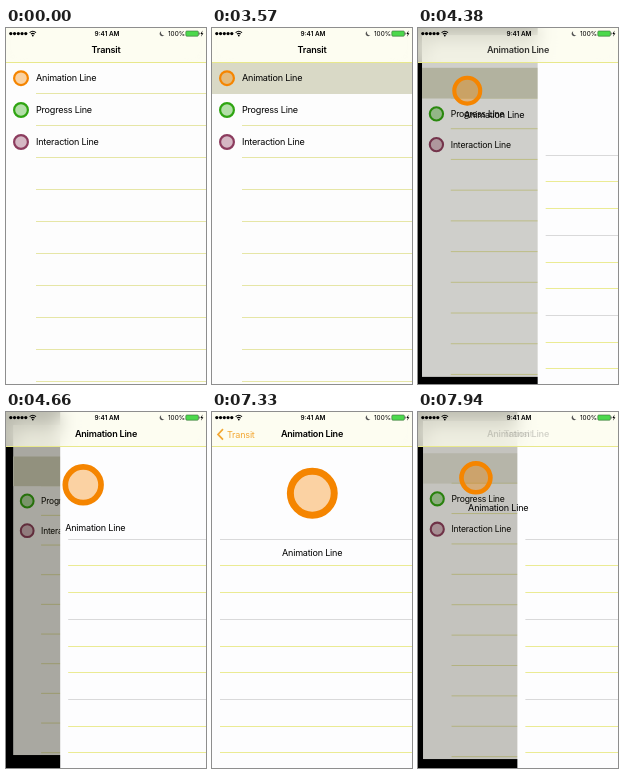
Animation of 200 by 356 pixels, one loop 8000 ms. Source, as an HTML page:

```html
<!DOCTYPE html>
<html lang="en">
<head>
<meta charset="utf-8">
<title>Line list transition</title>
<style>
  html, body { margin: 0; width: 100%; height: 100%; overflow: hidden; background: #000; }
  svg { display: block; position: absolute; left: 0; top: 0; }
  text { font: 9.07px Inter, "Open Sans", sans-serif; letter-spacing: -.024em; fill: #000; }
  .title { font-weight: 600; text-anchor: middle; }
  .status { font-size: 6.4px; font-weight: 600; letter-spacing: 0; }
  #bar {
    position: absolute; left: 0; top: 0; width: 200px; height: 34px;
    background: rgba(252, 252, 236, .74);
    -webkit-backdrop-filter: blur(9px); backdrop-filter: blur(9px);
  }
</style>
</head>
<body>
<svg id="scene" width="200" height="356">
  <g id="list">
    <rect width="200" height="356" fill="#fdfdfd"/>
    <g id="listLines"></g>
    <rect id="highlight" y="34" width="200" height="32" fill="#d9d9c6"/>
    <g id="rows"></g>
    <rect id="shade" width="200" height="356" fill="#181400"/>
  </g>
  <g id="panel">
    <rect width="200" height="356" fill="#fdfdfe"/>
    <g id="panelLines"></g>
  </g>
  <g id="disc"></g>
  <text id="label">Animation Line</text>
</svg>
<div id="bar">
  <svg width="200" height="35">
    <path d="M0 34.5H200" stroke="#e8e88c"/>
    <g id="signal"></g>
    <path d="M23.6 4.7Q26.8 1.9 30 4.7M24.9 6.2Q26.8 4.6 28.7 6.2" fill="none" stroke="#000" stroke-width="1.1"/>
    <circle cx="26.8" cy="7.6" r=".9"/>
    <text class="status" x="101" y="7.9" text-anchor="middle">9:41 AM</text>
    <path d="M155.2 3.2A2.6 2.6 0 1 0 158.4 7A2.7 2.7 0 0 1 155.2 3.2" fill="#555"/>
    <text class="status" x="162" y="7.9" style="font-weight:400">100%</text>
    <rect x="179.8" y="3" width="12.6" height="5.2" rx="1" fill="#4cd94c" stroke="#3a6a3a" stroke-width=".6"/>
    <path d="M193.2 4.6v2" stroke="#333" stroke-width=".8"/>
    <path d="M196.6 2.6L194.4 6H195.8L195 8.8L197.4 5.2H196Z"/>
    <text id="listTitle" class="title" x="100" y="25.4">Transit</text>
    <text id="panelTitle" class="title" x="100" y="25.4">Animation Line</text>
    <g id="back">
      <path d="M11 17.2L6 22.4L11 27.6" fill="none" stroke="#f09000" stroke-width="1.7"/>
      <text x="15" y="25.5" style="fill:#f09000">Transit</text>
    </g>
  </svg>
</div>
<script>
const LOOP = 8000;
const el = id => document.getElementById(id);
const set = (id, name, value) => el(id).setAttribute(name, value);
const mix = (a, b, p) => a + (b - a) * p;
const ramp = (t, from, to) => Math.min(1, Math.max(0, (t - from) / (to - from)));

const ring = color =>
  `<circle r="6.9" fill="${color}" fill-opacity=".36"/>
   <circle r="6.9" fill="none" stroke="${color}" stroke-width="2.2"/>`;

function lines(x, y, pitch, color) {
  let out = '';
  for (let i = 0; y + i * pitch < 356; i++)
    out += `<path d="M${x} ${Math.floor(y + i * pitch) + .5}H200" stroke="${color(i)}"/>`;
  return out;
}

const row = (y, name, color) =>
  `<g transform="translate(15 ${y})">${ring(color)}</g><text x="30" y="${y + 3.3}">${name}</text>`;

el('listLines').innerHTML = lines(30, 65.3, 32.07, () => '#e6e6a6');
el('panelLines').innerHTML = lines(8, 127.2, 26.7, i => i % 3 ? '#ebeb94' : '#d9d9da');
el('rows').innerHTML = row(82, 'Progress Line', '#2fa512') + row(114, 'Interaction Line', '#8c3c5e');
el('disc').innerHTML = ring('#f58500');
el('signal').innerHTML = [0, 1, 2, 3, 4].map(i => `<circle cx="${4.8 + 3.75 * i}" cy="5.6" r="1.6"/>`).join('');

// cubic-bezier(.5, 0, .55, 1), solved by bisection
function ease(x) {
  if (x <= 0 || x >= 1) return x <= 0 ? 0 : 1;
  let lo = 0, hi = 1, s;
  for (let i = 0; i < 24; i++) {
    s = (lo + hi) / 2;
    const at = 1.5 * (1 - s) ** 2 * s + 1.65 * (1 - s) * s * s + s ** 3;
    if (at < x) lo = s; else hi = s;
  }
  return s * s * (3 - 2 * s);
}

function draw(t) {
  const pop = ease(ramp(t, 7352, 8491));
  const p = ease(ramp(t, 3649, 5219)) - pop;
  const scale = 1 - .1 * p;

  set('list', 'transform', `translate(100 178) scale(${scale}) translate(-100 -178)`);
  set('shade', 'opacity', .5 * p);
  set('highlight', 'opacity', t < 3570 ? 0 : 1 - pop);
  set('panel', 'transform', `translate(${200 * (1 - p)} 0)`);
  set('disc', 'transform',
    `translate(${mix(15, 100.3, p)} ${mix(50.2, 81.2, p)}) scale(${mix(1, 3.18, p)})`);
  set('label', 'transform', `translate(${mix(30, 70, p)} ${mix(53.3, 144.1, p)})`);

  set('listTitle', 'opacity', 1 - ramp(t, 3649, 4200) + ramp(t, 7880, 8500));
  set('panelTitle', 'opacity', ramp(t, 4050, 4470) - ramp(t, 7352, 8050));
  set('back', 'opacity', ramp(t, 4950, 5500) - ramp(t, 7190, 7850));
}

function tick() {
  draw(performance.now() % LOOP);
  requestAnimationFrame(tick);
}
tick();
</script>
</body>
</html>
```
